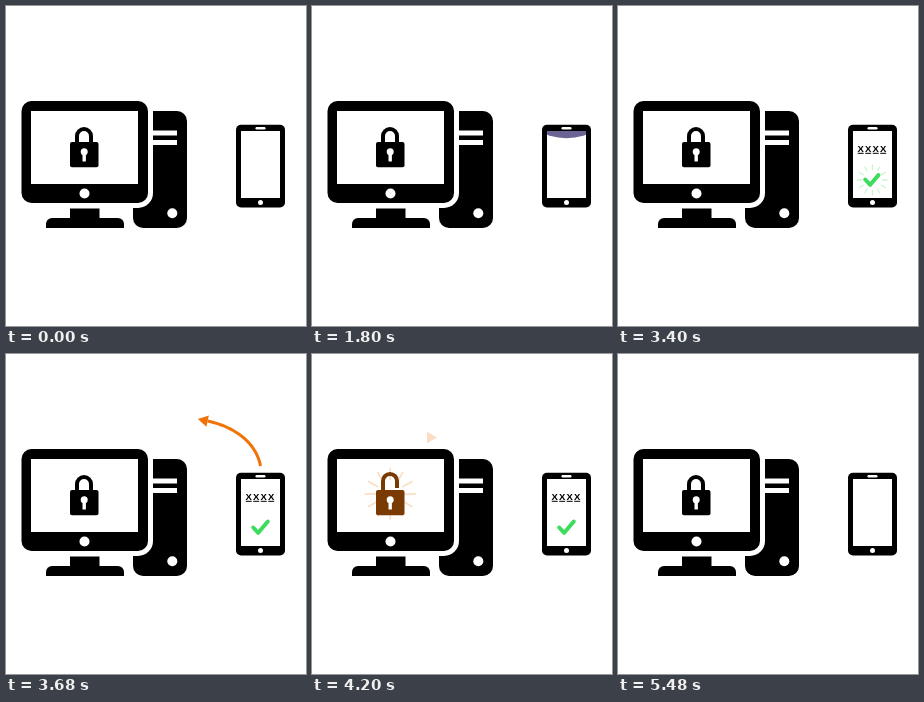
Write an HTML page with a canvas that moves like this. It is 300x320 px and loops after 5.76 s.

```html
<!DOCTYPE html>
<html lang="en">
<head>
<meta charset="utf-8">
<title>Phone unlock</title>
<style>
html, body { margin: 0; width: 100%; height: 100%; overflow: hidden; background: #fff; }
canvas { display: block; }
</style>
</head>
<body>
<canvas id="stage" width="300" height="320"></canvas>
<script>
const ctx = document.getElementById('stage').getContext('2d');
const LOOP = 5760;
const ORANGE = [240, 115, 6];
const ORANGE_CSS = `rgb(${ORANGE})`;
const GREEN = '#3cdd5c';

// Cubic curves as x and y control values
const TO_PHONE = { x: [109.5, 148, 236, 250], y: [87, 58, 58, 105.5] };
const TO_PC = { x: [254.5, 246, 170, 115], y: [112, 66, 48, 83.5] };

const progress = (t, from, to) => Math.min(1, Math.max(0, (t - from) / (to - from)));
const easeInOut = p => p * p * (3 - 2 * p);

function box(x, y, w, h, r, color = '#000') {
  ctx.fillStyle = color;
  ctx.beginPath();
  ctx.roundRect(x, y, w, h, r);
  ctx.fill();
}

function dot(x, y, r, color = '#fff') {
  ctx.fillStyle = color;
  ctx.beginPath();
  ctx.arc(x, y, r, 0, Math.PI * 2);
  ctx.fill();
}

function polyline(points, color, width) {
  ctx.strokeStyle = color;
  ctx.lineWidth = width;
  ctx.beginPath();
  points.forEach(([x, y]) => ctx.lineTo(x, y));
  ctx.stroke();
}

function withAlpha(alpha, draw) {
  if (alpha <= 0) return;
  ctx.save();
  ctx.globalAlpha = alpha;
  draw();
  ctx.restore();
}

function curvePoint({ x, y }, t) {
  const u = 1 - t;
  const at = v => u * u * u * v[0] + 3 * u * u * t * v[1] + 3 * u * t * t * v[2] + t * t * t * v[3];
  return [at(x), at(y)];
}

function arrow(curve, tail, tip, headScale) {
  const points = Array.from({ length: 41 }, (_, i) => curvePoint(curve, tail + (tip - tail) * i / 40));
  const [x, y] = points[40];
  let angle = 0;
  if (tail < tip) {
    const [px, py] = curvePoint(curve, tip - 0.01);
    angle = Math.atan2(y - py, x - px);
    polyline(points, ORANGE_CSS, 3);
  }
  ctx.save();
  ctx.translate(x, y);
  ctx.rotate(angle);
  ctx.scale(headScale, headScale);
  ctx.fillStyle = ORANGE_CSS;
  ctx.beginPath();
  ctx.moveTo(10, 0);
  ctx.lineTo(0, -5.7);
  ctx.lineTo(0, 5.7);
  ctx.fill();
  ctx.restore();
}

// Grow, hold, shrink from the tail, then fade the head
function flyingArrow(t, curve, start, growHead) {
  if (t < start) return;
  const tip = easeInOut(progress(t, start, start + 440));
  const tail = easeInOut(progress(t, start + 490, start + 650));
  const alpha = 1 - progress(t, start + 650, start + 770);
  withAlpha(alpha, () => arrow(curve, tail, tip, growHead ? tip ** 3 : Math.min(1, tip * 4)));
}

function burst(x, y, radius, color, p) {
  withAlpha(0.5 * Math.sin(Math.PI * p), () => {
    const outer = radius * (0.46 + 0.54 * p);
    const inner = outer - radius * 0.25;
    for (let i = 0; i < 12; i++) {
      const a = i * Math.PI / 6;
      const at = r => [x + r * Math.cos(a), y + r * Math.sin(a)];
      polyline([at(inner), at(outer)], color, radius / 28);
    }
  });
}

function computer() {
  box(127, 105, 54, 117, 10);
  box(10.5, 90, 136.5, 112, 15, '#fff');
  box(147, 124.5, 24, 5, 0, '#fff');
  box(147, 134, 24, 5, 0, '#fff');
  dot(166.3, 207.3, 5);
  box(15.5, 95, 126.5, 102, 10);
  box(25, 105, 107, 73, 0, '#fff');
  dot(78.5, 187.5, 5);
  box(64, 202.5, 29.5, 10, 0);
  box(40, 212, 78, 10, [6, 6, 0, 0]);
}

function phone() {
  box(230, 118.7, 49, 82.8, 5);
  box(235, 125, 39, 67, 0, '#fff');
  box(249.5, 121, 10, 2.5, 1.2, '#fff');
  dot(254.5, 196.6, 2.5);
}

function padlock(open) {
  const color = `rgb(${ORANGE.map(c => Math.round(c * open))})`;
  const lift = 6 * open;
  ctx.strokeStyle = color;
  ctx.lineWidth = 4;
  ctx.beginPath();
  ctx.moveTo(71, 138);
  ctx.lineTo(71, 130 - lift);
  ctx.arc(78, 130 - lift, 7, Math.PI, 0);
  ctx.lineTo(85, 137 - lift);
  ctx.stroke();
  box(64, 136, 28.5, 25.2, 2, color);
  dot(78.2, 145.8, 3.5);
  box(76.5, 147, 3.4, 8.5, 0.5, '#fff');
}

function notice(t) {
  const depth = 11 * progress(t, 1090, 1280) * (1 - progress(t, 1765, 1870));
  if (!depth) return;
  ctx.save();
  ctx.beginPath();
  ctx.rect(235, 125, 39, 67);
  ctx.clip();
  ctx.fillStyle = '#6a6394';
  ctx.beginPath();
  ctx.ellipse(254.5, 125, 22, depth, 0, 0, Math.PI * 2);
  ctx.fill();
  ctx.restore();
}

function passcode(t) {
  ctx.font = 'bold 9.5px "Liberation Sans", Arial, sans-serif';
  ctx.textAlign = 'center';
  for (let i = 0; i < 4; i++) {
    const x = 242.7 + i * 7.5;
    withAlpha(progress(t, 1900 + i * 40, 2040 + i * 40), () => box(x - 3, 146.8, 6, 1, 0));
    if (t >= 2740 + i * 180) {
      ctx.fillStyle = '#000';
      ctx.fillText('X', x, 146);
    }
  }
}

function checkmark(p) {
  if (!p) return;
  const first = Math.min(1, p * 3);
  const second = Math.max(0, p * 1.5 - 0.5);
  const points = [[247.2, 173.5], [247.2 + 5 * first, 173.5 + 5.3 * first]];
  if (second) points.push([252.2 + 9.6 * second, 178.8 - 11.3 * second]);
  ctx.lineCap = ctx.lineJoin = 'round';
  polyline(points, GREEN, 4);
  ctx.lineCap = 'butt';
  ctx.lineJoin = 'miter';
}

function draw(t) {
  const reset = progress(t, 5210, 5470);
  ctx.fillStyle = '#fff';
  ctx.fillRect(0, 0, 300, 320);
  computer();
  phone();
  notice(t);
  withAlpha(1 - reset, () => {
    passcode(t);
    checkmark(progress(t, 3220, 3420));
  });
  burst(254.3, 174, 22, GREEN, progress(t, 3230, 3610));
  burst(78.2, 140, 47, ORANGE_CSS, progress(t, 4130, 4580));
  padlock(progress(t, 4100, 4300) * (1 - reset));
  flyingArrow(t, TO_PHONE, 440, true);
  flyingArrow(t, TO_PC, 3460, false);
}

const start = performance.now();
function frame() {
  draw((performance.now() - start) % LOOP);
  requestAnimationFrame(frame);
}
frame();
</script>
</body>
</html>
```
